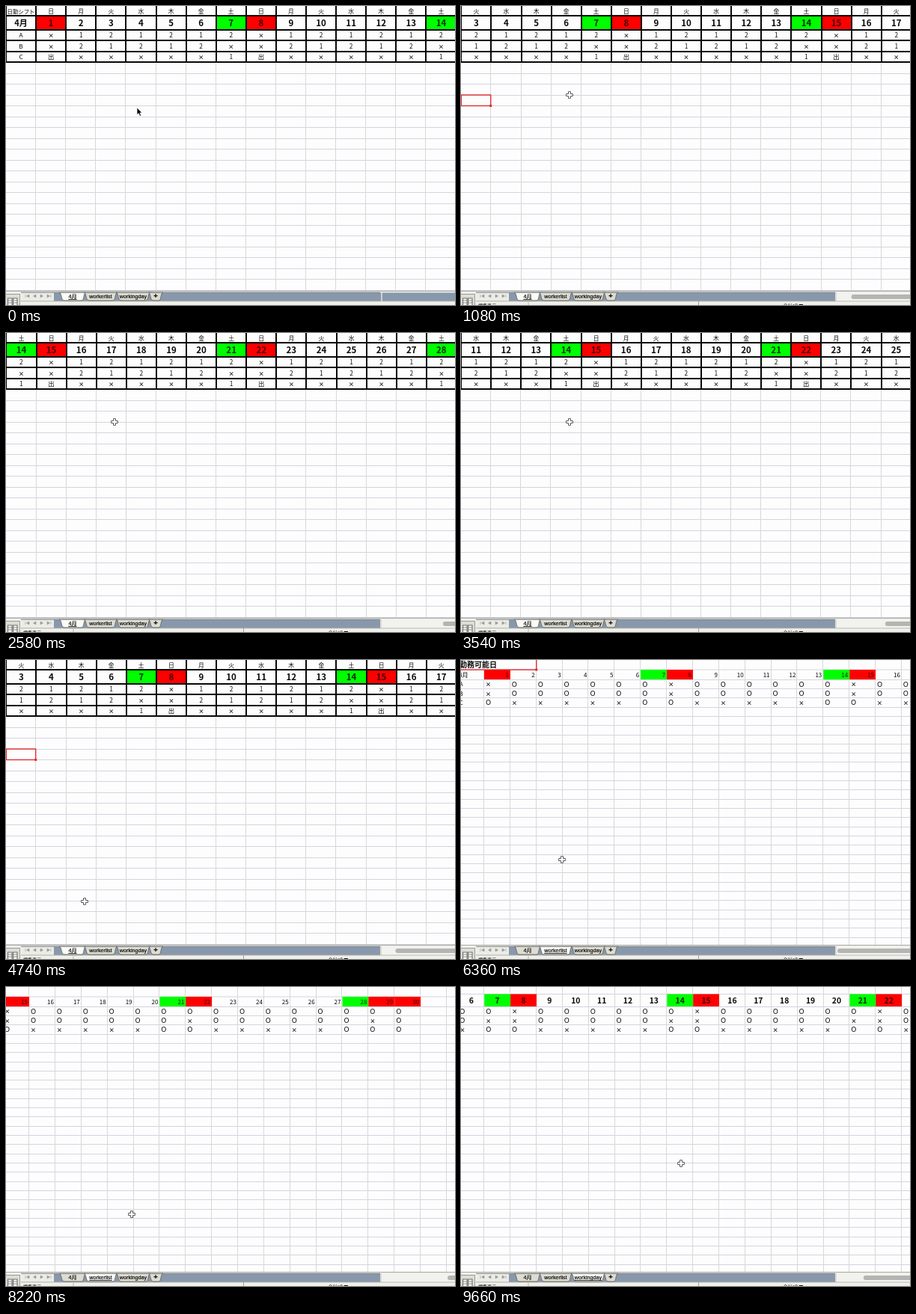
Recreate the animation shown at these times as an HTML page. Size 600 by 400 pixels, loop 9720 ms.

```html
<!DOCTYPE html>
<html lang="ja">
<head>
<meta charset="utf-8">
<title>日勤シフト</title>
<style>
html, body { margin: 0; width: 100%; height: 100%; overflow: hidden; background: #fdfdfd; }
svg { display: block; width: 600px; height: 400px; }
text { font-family: "Noto Sans CJK JP", "Noto Sans CJK", sans-serif; font-weight: 500; fill: #0c0c0c; text-anchor: middle; }
.tab text { font-family: "Liberation Sans", "Noto Sans CJK JP", sans-serif; stroke: #0c0c0c; stroke-width: .2; }
.tab path { fill: #dcdcd2; stroke: #5c5c58; stroke-width: .8; }
.tab.on path { fill: #fafaf6; }
.tab.on text { text-decoration: underline; }
</style>
</head>
<body>
<svg id="stage" viewBox="0 0 600 400"></svg>
<script>
const LOOP = 9720, STEP = 60, DAYS = 30;
const PAPER = '#fdfdfd', GRID = '#d4d4e2', GRID_V = '#d8d8d8', INK = '#080808';
const RED = '#fe0000', GREEN = '#00fe00', PICK = '#e03030';
const stage = document.getElementById('stage');

function add(parent, tag, attrs, text) {
  const el = document.createElementNS('http://www.w3.org/2000/svg', tag);
  for (const k in attrs) el.setAttribute(k, attrs[k]);
  if (text !== undefined) el.textContent = text;
  parent.appendChild(el);
  return el;
}
const rect = (p, x, y, w, h, fill, more) => add(p, 'rect', { x, y, width: w, height: h, fill, ...more });
const line = (p, x1, y1, x2, y2, stroke, w = 1) =>
  add(p, 'path', { d: `M${x1} ${y1}L${x2} ${y2}`, stroke, 'stroke-width': w, fill: 'none' });
const label = (p, x, y, size, str, style = '') =>
  add(p, 'text', { x, y, style: `font-size:${size}px;${style}` }, str);
const BOLD = 'font-weight:700;', START = 'text-anchor:start;', END = 'text-anchor:end;';

const isSat = d => d % 7 === 0;
const isOff = d => d % 7 === 1 || d === DAYS;
const dayFill = d => isSat(d) ? GREEN : isOff(d) ? RED : null;
const dayInk = d => 'fill:' + (isOff(d) ? '#400000' : isSat(d) ? '#002c00' : INK);

function selection(p, x, y, w, h) {
  rect(p, x, y, w, h, 'none', { stroke: PICK, 'stroke-width': 1.4 });
  rect(p, x + w - 1.5, y + h - 1.5, 3, 3, PICK);
}

function grid(p, x0, w, y0, step) {
  for (let y = y0; y < 381; y += step) line(p, -5, Math.floor(y) + .5, 2000, Math.floor(y) + .5, GRID);
  for (let c = 0; c < 50; c++) {
    const x = Math.round(x0 + c * w) - .5;
    line(p, x, 0, x, 381, GRID_V);
  }
}

// Small crosses sit a little lower than digits of the same row
const mark = (p, x, y, size, s) => s === '×' ? label(p, x, y - .4, 7.4, s, BOLD) : label(p, x, y, size, s);

function shiftSheet() {
  const W = 40.1, g = add(stage, 'g', {}), end = W * (DAYS + 1);
  const rows = [13, 32, 46, 61, 75];
  grid(g, 0, W, 90, 14.5);
  const shift = d => {
    if (isOff(d)) return ['×', '×', '出'];
    if (isSat(d)) return ['2', '×', '1'];
    return (d - 1) % 7 % 2 ? ['1', '2', '×'] : ['2', '1', '×'];
  };
  label(g, 20, 9.8, 7.4, '日勤シフト');
  label(g, 20, 27, 11, '4月', BOLD);
  ['A', 'B', 'C'].forEach((s, i) => label(g, 20, 42.4 + i * 14.5, 8.2, s));
  for (let d = 1; d <= DAYS; d++) {
    const x = d * W, mid = x + W / 2, fill = dayFill(d);
    if (fill) rect(g, x, 13, W, 19, fill);
    label(g, mid, 9.8, 7.8, '日月火水木金土'[(d - 1) % 7]);
    label(g, mid, 27.2, 11.5, d, BOLD + dayInk(d));
    shift(d).forEach((s, i) => mark(g, mid, 42.4 + i * 14.5, 8.4, s));
  }
  const lines = add(g, 'g', { 'shape-rendering': 'crispEdges' });
  for (const y of rows) line(lines, 0, y, end, y, INK, 2);
  for (let c = 0; c <= DAYS + 1; c++) {
    const x = Math.round(c * W);
    line(lines, x, 0, x, 76, INK, 2);
  }
  const pick = add(g, 'g', {});
  selection(pick, 3 * W, 119, W - .7, 14.5);
  return { g, w: W, pick };
}

function listSheet(title, big, marks) {
  const W = 34.87, ROW = 12.32, X = 31 - W, g = add(stage, 'g', {}), top = big ? 9.5 : 13;
  grid(g, X, W, 26.1, ROW);
  line(g, X, top, 2000, top, GRID);
  rect(g, X, 0, W * 3 - .5, top - .5, PAPER);
  label(g, -2, 9.8, 10, title, BOLD + START);
  label(g, -3, 23, 8.2, '4月', START);
  ['A', 'B', 'C'].forEach((s, i) => label(g, 0, 35.3 + i * ROW, 8.2, s));
  for (let d = 1; d <= DAYS; d++) {
    const x = X + d * W, fill = dayFill(d);
    if (fill) rect(g, x, top, W, 26 - top, fill);
    if (big) label(g, x + W / 2, 21.8, 10.4, d, BOLD + dayInk(d));
    else label(g, x + W - 2, 23, 8, d, END + dayInk(d));
    marks(d).forEach((free, i) => mark(g, x + 5.5, 35.6 + i * ROW, 9.6, free ? 'O' : '×'));
  }
  if (!big) selection(g, X, -2, W * 3, 15);
  return { g, w: W };
}

const sheets = [
  shiftSheet(),
  listSheet('勤務可能日', false, d => {
    const sun = d % 7 === 1;
    return [!sun || d > 21, !sun, isSat(d) || isOff(d)];
  }),
  listSheet('勤務日', true, d => [!isOff(d), !isOff(d) && !isSat(d), isSat(d) || isOff(d)])
];

// Bottom bar
const bar = add(stage, 'g', {});
rect(bar, 0, 381, 600, 19, '#f0f0ea');
line(bar, 0, 381.5, 600, 381.5, '#a8a8a4');
rect(bar, 64, 383.5, 436, 11, '#8898ac');
line(bar, 20, 383.3, 500, 383.3, '#606468', .8);
line(bar, 20, 394.8, 600, 394.8, '#8c8c88', .8);
rect(bar, 21, 384, 43, 10.3, '#ececE6');
add(bar, 'path', {
  d: 'M26 386v4M31 386v4l-3.5-2zM40 386v4l-3.5-2zM46 386v4l3.5-2zM55 386v4l3.5-2zM60 386v4',
  fill: '#9a9a9a', stroke: '#9a9a9a', 'stroke-width': .6
});
rect(bar, -1, 385.5, 19.5, 16, '#dedeD8', { stroke: '#8c8c88', 'stroke-width': .8 });
for (const x of [2.5, 9.5]) {
  rect(bar, x, 391, 5.5, 10, '#f8f8f4', { stroke: '#5c5c5c', 'stroke-width': .9 });
  for (const y of [394, 397]) line(bar, x, y, x + 5.5, y, '#5c5c5c', .7);
}

function tab(x, w, str, size = 7.2, style = '') {
  const g = add(bar, 'g', { class: 'tab' }), r = x + w;
  add(g, 'path', { d: `M${x} 383.3C${x + 4} 384 ${x + 2} 394 ${x + 7} 394H${r - 6}C${r - 2} 394 ${r - 4} 384 ${r} 383.3Z` });
  label(g, x + w / 2, 391, size, str, style);
  return g;
}
tab(190, 20, '+', 9.5, BOLD);
const tabs = [tab(71, 36, '4月'), tab(104, 45, 'workerlist'), tab(147, 46, 'workingday')];

const idle = add(bar, 'g', {});
rect(idle, 500, 383.5, 100, 11, '#8898ac');
line(idle, 502, 383, 502, 395, '#f0f0e8', 1.3);

const live = add(bar, 'g', {});
rect(live, 500, 383.5, 100, 11, '#f2f2ee');
line(live, 501, 383, 501, 395, '#b8b8b4', .8);
const thumb = rect(live, 503, 386, 130, 6, '#b4b4b2', { rx: 3 });
label(live, 35, 403.3, 6.2, '標準表示');
line(live, 90, 396, 90, 400, '#a8a8a4', .8);
line(live, 317.5, 395, 317.5, 400, '#8c8c88', .8);
label(live, 444, 403.3, 6.2, '合計=0 ▼');

// Pointers
const arrow = add(stage, 'path', {
  d: 'M0 0V9.6L2.2 7.6L3.8 11.3L5.6 10.5L4 6.9H6.9Z', fill: INK, stroke: '#fff', 'stroke-width': .7
});
const cross = add(stage, 'path', {
  d: 'M-1.5-4.4H1.5V-1.5H4.4V1.5H1.5V4.4H-1.5V1.5H-4.4V-1.5H-1.5Z',
  fill: '#fff', stroke: '#484848', 'stroke-width': .9
});

// Each key is [time, values...]
const pointerKeys = [
  [0, 175, 136], [60, 175, 136], [360, 145, 119], [3660, 145, 119], [4740, 105, 323],
  [5040, 124, 387], [5220, 124, 387], [6000, 135, 267], [7320, 135, 267],
  [7980, 164, 288], [8220, 168, 304], [8580, 170, 387], [8760, 170, 387], [9300, 294, 236], [LOOP, 294, 236]
];
const scrollKeys = [
  [[600, 0], [1800, 8], [2850, 16], [3060, 16], [3540, 11], [4740, 3], [5040, 0]],
  [[6480, 0], [7260, 6], [8160, 15]],
  [[9300, 0], [9660, 6]]
];
const CLICK = 420, OPEN_LIST = 5160, OPEN_WORK = 8700;

function at(keys, t) {
  if (t <= keys[0][0]) return keys[0].slice(1);
  for (let i = 1; i < keys.length; i++) {
    const a = keys[i - 1], b = keys[i];
    if (t <= b[0]) {
      const k = (t - a[0]) / (b[0] - a[0]);
      return a.slice(1).map((v, j) => v + (b[j + 1] - v) * k);
    }
  }
  return keys[keys.length - 1].slice(1);
}
const show = (el, on) => el.setAttribute('visibility', on ? 'visible' : 'hidden');

function draw(time) {
  const t = Math.floor(time / STEP) * STEP;
  const active = t >= CLICK, now = t >= OPEN_WORK ? 2 : t >= OPEN_LIST ? 1 : 0;
  const [scroll] = at(scrollKeys[now], t), [x, y] = at(pointerKeys, t);
  const shift = Math.round(Math.round(scroll) * sheets[now].w);
  sheets.forEach((s, i) => {
    s.g.style.display = i === now ? '' : 'none';
    tabs[i].classList.toggle('on', i === now);
  });
  sheets[now].g.setAttribute('transform', `translate(${-shift} 0)`);
  show(sheets[0].pick, active);
  show(live, active);
  show(idle, !active);
  thumb.setAttribute('x', 503 + scroll * 5.8);
  const pointing = !active || y > 381;
  show(arrow, pointing);
  show(cross, !pointing);
  (pointing ? arrow : cross).setAttribute('transform', `translate(${x} ${y})`);
}

const start = performance.now();
function tick() {
  draw((performance.now() - start) % LOOP);
  requestAnimationFrame(tick);
}
tick();
</script>
</body>
</html>
```
